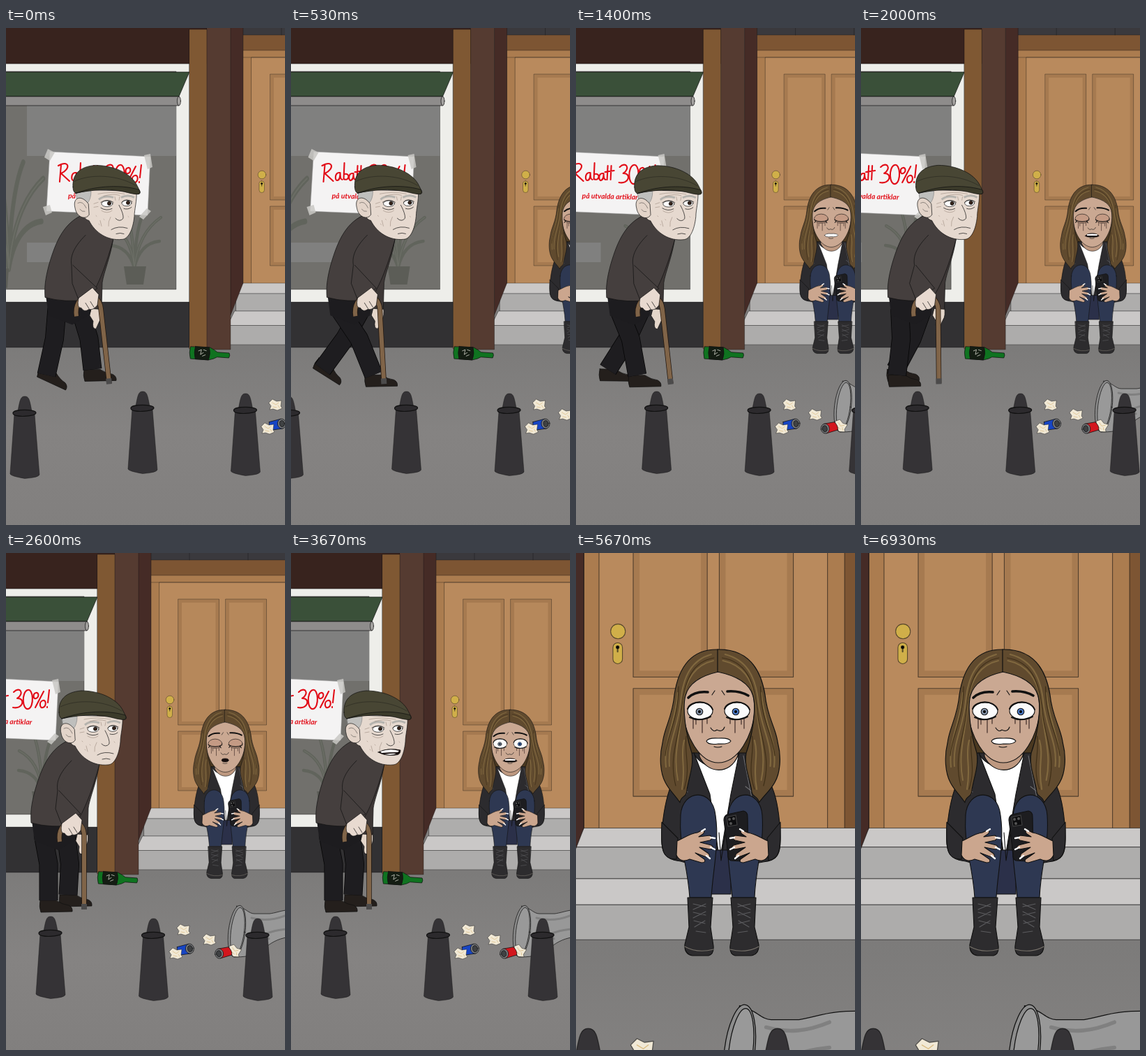
An HTML page that plays this animation: 400 px wide and 711 px high, repeating every 7000 ms.

```html
<!DOCTYPE html>
<html lang="sv">
<head>
<meta charset="utf-8">
<title>På trappan</title>
<style>
html, body { margin: 0; width: 100%; height: 100%; overflow: hidden; background: #82807f; }
svg { display: block; width: 100vw; height: 100vh; }
.ln { stroke: #111; stroke-width: .7; stroke-linejoin: round; stroke-linecap: round; }
.gl { stroke: #111; stroke-width: 1.1; stroke-linejoin: round; stroke-linecap: round; }
.soft { stroke-opacity: .6; stroke-width: .6; }
.no { fill: none; }
</style>
</head>
<body>
<svg viewBox="0 0 400 711" preserveAspectRatio="none">
<defs>
  <linearGradient id="ground" x2="0" y2="1"><stop stop-color="#7b7a79"/><stop offset=".5" stop-color="#858382"/><stop offset="1" stop-color="#817f7e"/></linearGradient>
  <g id="bollard" class="ln" stroke-opacity=".6" fill="#353336">
    <path d="M-15 25L-21 111Q-20 114 0 117.500Q20 116 21 112L14 25Z"/>
    <path d="M-10 21C-7 5 -6 0 0 0S7 5 10 21Z"/>
    <path fill="#2c2a2d" stroke-width="1.200" stroke-opacity="1" d="M-17 24C-17 18 16 18 16 23.500S-17 31 -17 24Z"/>
  </g>
  <g id="paper" class="ln" stroke-opacity=".6">
    <path fill="#f1e9d6" d="M-9 -3L-4 -8L2 -5L9 -6L8 2L10 5L3 8L-3 6L-8 7L-6 2Z"/>
    <path class="no" stroke="#c99b45" d="M-4 -3L1 0L5 -3M-3 3L2 4M4 1L6 4"/>
  </g>
  <g id="can" class="ln">
    <path d="M-11 -5L6 -7Q10 0 7 7L-8 7Q-13 1 -11 -5Z"/>
    <ellipse cx="6.500" rx="6" ry="7" fill="#77797c"/><ellipse cx="7" rx="3.500" ry="4.500" fill="#3f4143"/>
  </g>
  <g id="leaves" fill="none" stroke="#595e54" stroke-width="4.500" stroke-linecap="round" opacity=".65">
    <path d="M0 0Q-4 -45 -33 -60M0 0Q-8 -30 -34 -32M0 0Q-2 -55 -12 -82M0 0Q6 -50 38 -72M0 0Q8 -35 36 -38M0 0Q2 -60 16 -85"/>
    <path stroke="#6a6e64" stroke-width="1.200" d="M0 0Q-4 -45 -33 -60M0 0Q-2 -55 -12 -82M0 0Q6 -50 38 -72"/>
  </g>
  <g id="shoe" class="ln"><path fill="#241f1c" d="M-12 -9L11 -9Q20 -3 29 -2Q35 1 34 7L-11 8Q-14 0 -12 -9Z"/></g>
  <g id="hair" class="gl">
    <path fill="#604a2e" d="M204 138C166 137 147 163 141 203C138 236 127 248 124 272C119 292 121 315 128 328C134 340 142 346 149 357C150 347 159 350 159 339C162 320 169 305 166 286C158 262 152 222 157 204C163 182 186 174 204 170Z"/>
    <g class="no" stroke="#80683f" stroke-width="2">
      <path d="M194 145C166 153 154 175 150 212C147 250 131 270 134 305"/>
      <path d="M197 154C171 160 158 180 153 212C151 256 138 285 146 325"/>
      <path d="M146 200C143 242 125 268 129 306M155 268C149 292 158 305 152 338"/>
    </g>
    <g class="no" stroke="#3f2f18">
      <path d="M198 150C168 155 155 180 151 228C149 260 132 290 143 333M147 191C147 240 130 260 128 290M158 262C155 290 165 305 155 338"/>
    </g>
  </g>
  <g id="boot" class="gl">
    <path fill="#2d2c2e" d="M160 493L196 493L193 535L197 562Q198 574 190 576L167 576Q155 574 156 560L162 535Z"/>
    <path class="no" stroke="#77726a" d="M156 563Q174 573 197 567"/>
    <path class="no" stroke="#5c5c5f" d="M168 502L186 506M186 502L168 510M168 514L186 518M186 513L168 522M169 526L185 530M185 526L170 535M172 541L186 543"/>
  </g>
  <g id="hand" class="gl" fill="#cba68e">
    <path d="M145 412C154 408 164 401 174 400L182 396Q186 398 182 402L176 406L192 404Q198 408 192 411L178 414L194 418Q199 421 193 424L177 421L190 430Q194 436 187 435L171 429L184 438Q187 443 180 443L163 438C155 442 147 440 144 432Z"/>
    <path class="no" stroke="#fff" stroke-width="2.400" d="M180 398L185 395M193 407L199 408M193 421L199 424M187 433L192 437"/>
  </g>
  <path id="tears" class="no" stroke="#5b453d" stroke-width="1.500" stroke-linecap="round" d="M168 237L168 251M172 239L172 245M181 239L181 257M188 236L188 244"/>
  <g id="openEye">
    <ellipse class="gl" cx="178" cy="226" rx="18" ry="12" fill="#fbfbfb"/>
    <path class="no gl" style="stroke-width:2" d="M160 223C164 211 190 209 196 224M163 235Q177 242 193 234"/>
  </g>
  <g id="shutEye">
    <ellipse class="gl" cx="178" cy="226" rx="18" ry="12" fill="#c49a84"/>
    <path class="no gl" style="stroke-width:2" d="M160 229Q178 239 196 229M164 232L161 236M190 233L193 237"/>
  </g>
</defs>

<g id="cam">
  <rect x="-140" y="440" width="580" height="280" fill="url(#ground)"/>

  <!-- shop -->
  <g class="ln soft">
    <rect x="-140" y="392" width="271" height="65" fill="#323133"/>
    <rect x="-140" y="51" width="271" height="341" fill="#eeeeea"/>
    <rect x="-140" y="62" width="252" height="312" fill="#71706c"/>
    <rect x="-140" y="-2" width="300" height="53" fill="#38231e"/>
  </g>
  <path fill="#80807f" d="M-102 105H112V183H-102ZM-102 307H-16V335H-102Z"/>
  <use href="#leaves" x="52" y="343"/>
  <use href="#leaves" transform="translate(-128 345) scale(1.300 1.800)"/>
  <path fill="#5c5d57" d="M37 341H69L65 367H41ZM-140 344H-128L-130 372H-140Z"/>
  <g class="ln">
    <path fill="#3a5039" d="M-140 63H131L116 98H-140Z"/>
    <path fill="#8e8c8b" d="M-140 98H116Q119 105 116 111H-140Z"/>
    <ellipse cx="116" cy="104.500" rx="2.500" ry="6.500" fill="#a5a3a1"/>
  </g>
  <path fill="#f4f3f3" stroke="#aaa" stroke-width=".5" d="M-69 177L75 184L71 268L-74 262Z"/>
  <g fill="#c9c8c5" opacity=".85">
    <path d="M-72 173L-62 178L-69 190L-77 185ZM66 182L75 180L78 199L71 202ZM59 270L70 258L76 262L65 274ZM-79 256L-69 253L-66 264L-75 268Z"/>
  </g>
  <g class="no" stroke="#e20d18" stroke-width="2.100" stroke-linecap="round" stroke-linejoin="round">
    <path d="M-53 196L-55 220M-57 197C-42 188 -38 201 -53 208L-41 219M-32 207C-39 206 -39 219 -35 218C-31 217 -31 212 -31 207Q-31 217 -28 217M-25 193L-26 216C-18 220 -16 207 -25 209M-13 208C-20 207 -19 219 -16 218C-12 217 -12 212 -12 208Q-12 217 -9 217M-6 197L-7 217M-1 197L-2 217M-10 206L3 204"/>
    <path d="M11 199C20 190 27 201 16 208C28 207 25 224 10 221M31 196C22 199 23 225 32 223C41 220 39 193 31 196M43 200C38 201 39 210 43 208C48 206 47 199 43 200M54 198L42 221M53 211C47 212 48 223 53 221C58 219 58 210 53 211M62 196L60 214M59 220V221"/>
  </g>
  <text transform="translate(-43 243.500) rotate(1.500)" fill="#e20d18" font-family="Lato, sans-serif" font-weight="700" font-style="italic" font-size="10.300">på utvalda artiklar</text>

  <!-- doorway -->
  <g class="ln soft">
    <rect x="208" y="-2" width="230" height="380" fill="#7d5533"/>
    <path fill="#3a393d" d="M208 -2H438V10H208ZM263 -2V10M347 -2V10"/>
    <path fill="#ab7c4f" d="M208 32H414V370H208Z"/>
    <path fill="#b98a5d" d="M220 42H400.500V370H220Z"/>
    <path d="M208 42H414"/>
    <g id="panels"></g>
    <circle cx="235" cy="210" r="5.800" fill="#d0af49"/>
    <rect x="231" y="219" width="7.500" height="16.500" rx="3.700" fill="#d0af49"/>
    <path d="M234.700 223V226" stroke-width="1.200"/><circle cx="234.700" cy="222.500" r="1.200"/>
    <path fill="#cac8c7" d="M208 365H440V380H198Z"/>
    <path fill="#aeadac" d="M198 380H440V405H198Z"/>
    <path fill="#cac8c7" d="M196 405H440V425.500H186Z"/>
    <path fill="#adacab" d="M186 425.500H440V453H186Z"/>
    <path fill="#452b26" d="M190 -2H208V365L190 411Z"/>
    <path fill="#553b31" d="M156 -2H190V460H156Z"/>
    <path fill="#7f5833" d="M131 2H156V459H131Z"/>
  </g>

  <!-- bottle -->
  <g class="ln" transform="translate(131 464) rotate(4)">
    <path fill="#0f7320" d="M1 -8Q-1 0 2 9L28 9Q36 7 40 4L57 4Q59 0 57 -3L40 -3Q36 -6 29 -9Z"/>
    <path fill="#141d13" d="M8 -9H28Q31 0 28 9H9Q6 0 8 -9Z"/>
    <path class="no" stroke="#e5e5da" d="M13 -3L17 -5L16 2L20 -1M20 -5L24 -4M19 4L23 2"/>
  </g>

  <!-- seated girl, in close-up coordinates -->
  <g transform="translate(201.800 148.200) scale(.551)">
    <path class="gl" fill="#4a3820" d="M155 190H255L264 325H148Z"/>
    <path class="gl" fill="#2c2b2e" d="M167 286C140 312 127 345 123 400C121 430 128 439 150 441L200 455L268 442C288 440 294 432 293 405C291 350 282 318 243 286Z"/>
    <path class="gl" fill="#fff" d="M169 286C180 312 225 314 234 286L222 345L206 440L192 345Z"/>
    <path class="gl" fill="#bd9880" d="M177 270V291C188 316 221 318 232 290V270Z"/>
    <path class="gl no" style="stroke:#6d6d70" d="M165 290L158 345M240 290L252 350M150 335L160 342M243 334L252 341"/>
    <path class="gl" fill="#2b3049" d="M192 425H223L222 488H192Z"/>
    <g class="gl" fill="#2e3852">
      <path d="M150 375C153 337 196 336 200 375C206 415 196 455 194 493H163C160 445 147 420 150 375Z"/>
      <path d="M267 375C264 337 222 336 218 375C213 415 221 455 224 493H256C258 445 270 420 267 375Z"/>
    </g>
    <path class="gl no" d="M205 400L208 440L214 402"/>
    <path class="gl" fill="#1d1d20" d="M217 374L240 369Q246 370 246 377L247 435Q244 441 238 441L222 440Q217 438 218 430L212 382Q212 376 217 374Z"/>
    <path class="gl" fill="#0d0d0f" style="stroke:#444" d="M216 378L229 375L231 389L218 391Z"/>
    <g fill="#555"><circle cx="220" cy="381" r="2"/><circle cx="226" cy="380" r="2"/><circle cx="222" cy="387" r="2"/></g>
    <path class="gl" fill="#2c2b2e" d="M123 385L146 408L144 438C125 438 121 428 123 385ZM293 385L274 408L276 440C292 438 294 425 293 385Z"/>
    <use href="#hand"/><use href="#hand" transform="translate(420 0) scale(-1 1)"/>
    <use href="#boot"/><use href="#boot" transform="translate(418 0) scale(-1 1)"/>
    <path class="gl" fill="#caa892" d="M204 160C172 165 153 185 154 224C155 262 178 300 204 300C232 300 254 262 256 224C256 185 236 165 204 160Z"/>
    <use href="#hair"/><use href="#hair" transform="translate(203 0) scale(-1.080 1) translate(-204 0)"/>
    <path class="no gl" style="stroke-width:3.600" d="M161 207C168 200 178 198 189 199M217 198C229 197 238 199 247 204"/>
    <path class="no gl" d="M195 203L199 197M209 197L213 203M193 250Q197 257 202 253Q210 257 213 249M198 277Q203 279 209 277"/>
    <use href="#tears"/><use href="#tears" transform="translate(409 0) scale(-1 1)"/>
    <g id="wide">
      <use href="#openEye"/><use href="#openEye" x="53"/>
      <g class="gl"><circle cx="177" cy="227" r="4.800" fill="#8190a5"/><circle cx="229" cy="227" r="4.800" fill="#4a78c4"/></g>
      <circle cx="177" cy="227" r="2"/><circle cx="229" cy="227" r="2"/>
    </g>
    <g id="shut"><use href="#shutEye"/><use href="#shutEye" x="53"/></g>
    <g class="gl">
      <ellipse id="mo" cx="204" cy="269" rx="9" ry="4.500" fill="#150b0b"/>
      <path id="mt" fill="#fff" d="M187 269Q190 264 204 265Q219 264 222 269Q219 274 204 273Q189 275 187 269Z"/>
      <g id="ma"><path fill="#180c0c" d="M186 271Q190 264 204 264Q217 264 222 271Q217 275 204 274Q191 275 186 271Z"/><path fill="#fff" stroke="none" d="M190 267Q204 264 218 267L217 270H191Z"/></g>
    </g>
  </g>

  <!-- litter -->
  <g class="ln">
    <path fill="#989898" d="M331 505C344 508 348 516 356 516H378C393 514 402 507 440 510V550C415 548 390 545 366 570C354 577 340 578 327 578Z"/>
    <path class="no" style="stroke:#808080;stroke-width:3" d="M352 522C370 527 385 525 402 518M350 560C365 545 382 540 402 538M357 535L377 552"/>
    <ellipse cx="331" cy="541" rx="12" ry="37" transform="rotate(7 331 541)" fill="#8c8c8c"/>
    <ellipse cx="332" cy="541" rx="9.500" ry="34" transform="rotate(7 332 541)" fill="#999"/>
  </g>
  <use href="#paper" x="254" y="539"/><use href="#paper" x="291" y="553"/>
  <use href="#can" fill="#1745c4" transform="translate(257 567) rotate(-8)"/>
  <use href="#paper" x="243" y="573"/>
  <use href="#paper" transform="translate(327 569) rotate(25)"/>
  <use href="#can" fill="#d3161d" transform="translate(312 572) rotate(170)"/>

  <!-- old man -->
  <g id="man">
    <g id="legB"></g><g id="legA"></g>
    <path fill="#1d1c1f" d="M37 383H101L98 412L75 425L41 412Z"/>
    <path class="ln" fill="#e4d6ca" d="M103 400L117 400Q119 413 115 418L109 431Q103 431 105 420L100 412Z"/>
    <path class="ln" fill="#3d3736" d="M134 300C131 325 120 350 118 365L117 403L102 402L104 350Z"/>
    <path class="ln" fill="#453f3e" d="M92 267C64 278 52 304 42 338C36 360 35 372 36 386Q65 394 98 389C112 372 125 335 134 302L112 280Z"/>
    <path id="cane0" class="no" stroke="#221811" stroke-width="7.500"/>
    <path id="cane" class="no" stroke="#806448" stroke-width="6"/>
    <path id="tip" class="no" stroke="#4c4b4b" stroke-width="8"/>
    <path id="sleeve" class="ln" fill="#453f3e"/>
    <g id="grip"><path class="ln" fill="#e8dad0" d="M-14 -4L6 -19L15 -9L13 6Q7 14 1 12Q-6 17 -10 10Q-17 11 -14 -4Z"/><path class="ln no" d="M-4 3L1 11M3 1L8 9"/></g>
    <!-- head -->
    <g class="ln">
      <path fill="#e6d9cf" d="M90 232L167 234C168 248 164 260 164 270C162 290 155 303 146 303C126 305 108 294 99 276C94 275 90 270 90 262Z"/>
      <path fill="#bfbfbd" stroke="#888" d="M80 233L102 234Q102 246 96 252L93 268Q82 262 80 233Z"/>
      <path fill="#e3d4c9" d="M98 252C88 238 75 243 79 258C81 271 94 276 99 268Z"/>
      <path class="no" stroke-opacity=".6" d="M83 251Q90 247 95 258M86 260Q89 264 93 263"/>
    </g>
    <path class="no" stroke="#b5b3ae" stroke-width="3" d="M113 246Q121 239 134 243M145 243Q155 238 164 243"/>
    <g class="ln">
      <ellipse cx="125" cy="252" rx="8" ry="4.300" fill="#fff"/><ellipse cx="153" cy="251" rx="7" ry="4.300" fill="#fff"/>
      <circle cx="128" cy="251.500" r="2.600" fill="#35231a"/><circle cx="155" cy="250.500" r="2.600" fill="#35231a"/>
      <path class="no" d="M116 250Q125 244 134 250M146 250Q153 244 161 249M142 254Q149 267 148 273Q143 279 137 273M116 258Q124 263 132 259M149 259Q155 261 160 257"/>
      <path class="no" stroke="#8d7a6e" stroke-opacity=".7" d="M117 262Q125 267 132 262M112 238Q130 234 150 238M120 241Q133 237 143 240M106 252L112 250M106 257L112 256M130 271Q126 278 127 284M115 276L117 284M109 269L110 270M120 274L121 275M113 281L114 282M137 247L136 242M142 247L143 242M155 270L156 271"/>
      <path id="closed" class="no" d="M131 289Q141 283 154 287M138 295Q144 293 149 295"/>
      <g id="open"><path fill="#160d0b" d="M125 285Q139 278 157 282Q157 289 150 289Q136 291 125 285Z"/><path fill="#fff" stroke="none" d="M128 284Q142 279 155 283L153 285Q140 285 130 286Z"/><path fill="#fff" stroke="none" d="M134 288Q146 286 151 287Q146 290 134 288Z"/></g>
      <path fill="#484634" d="M76 228C75 211 84 199 108 197C135 197 160 209 168 226L172 234C174 241 166 238 150 234C128 229 103 231 80 237Q76 235 76 228Z"/>
      <path fill="#3b3a2a" d="M80 237C103 228 140 223 171 232C175 241 166 239 150 235C126 230 103 232 80 237Z"/>
      <path class="no" stroke-opacity=".5" d="M78 220C100 209 140 210 166 226"/>
    </g>
  </g>

  <use href="#bollard" x="-105" y="527"/><use href="#bollard" x="64" y="520"/>
  <use href="#bollard" x="211.500" y="523"/><use href="#bollard" x="361" y="523"/>
</g>
</svg>
<script>
const $ = id => document.getElementById(id);
const set = (id, name, value) => $(id).setAttribute(name, value);
const show = (id, on) => $(id).style.display = on ? '' : 'none';

const LOOP = 7000, STOP = 2300, CUT = 5530;
const TIMES = [0, 500, 1000, 1400, 2000, STOP];
const GAIT = {
  near: [49, 115, 32, 91, 60, 72],
  far: [115, 40, 97, 49, 58, 100],
  cane: [128, 118, 111, 128, 109, 112],
  hand: [98, 94, 90, 98, 90, 94]
};
// girl's mouth every 200 ms: o small, t teeth, a open
const MOUTHS = 'taotaoatotataooooaaaaaaaaaaataotatt';

const panel = (x, y, w, h) =>
  `<rect x="${x}" y="${y}" width="${w}" height="${h}" fill="#a67a50"/>
   <rect x="${x + 5}" y="${y + 5}" width="${w - 10}" height="${h - 10}" fill="#b6885b" stroke="none"/>`;
$('panels').innerHTML = [247, 315].map(x => panel(x, 66, 58.5, 180) + panel(x, 255, 58.5, 85)).join('');

function pose(values, t) {
  let i = 0;
  while (i < TIMES.length - 2 && t > TIMES[i + 1]) i++;
  const u = Math.min(1, (t - TIMES[i]) / (TIMES[i + 1] - TIMES[i]));
  return values[i] + (values[i + 1] - values[i]) * u * u * (3 - 2 * u);
}

function leg(id, hip, foot, other, y) {
  const ankle = foot - 11, tilt = Math.max(0, other - foot - 40);
  const d = `M${hip} 402L${(hip + ankle) / 2 + 4} 445L${ankle} ${y - 9}`;
  const line = (color, width) =>
    `<path d="${d}" fill="none" stroke="${color}" stroke-width="${width}" stroke-linejoin="round"/>`;
  $(id).innerHTML = `<use href="#shoe" transform="translate(${ankle} ${y - tilt / 3}) rotate(${tilt})"/>`
    + line('#050505', 27) + line('#1e1d20', 25.5);
}

function draw(t) {
  const left = Math.max(0, 1 - t / STOP), shift = 132 * left;
  set('cam', 'transform', t < CUT ? `translate(${shift} 0)` : 'translate(-366.3 -269) scale(1.815)');
  const bob = left && Math.sin(t / 160) * .6 - .6;
  set('man', 'transform', `translate(${20 * left - shift} ${bob})`);

  const near = pose(GAIT.near, t), far = pose(GAIT.far, t);
  leg('legB', 86, far, near, 498);
  leg('legA', 53, near, far, 506);

  const h = pose(GAIT.hand, t), c = pose(GAIT.cane, t), top = h + 18;
  const cane = `M${h - 17} 413C${h - 22} 380 ${top - 3} 374 ${top} 402L${c} 509`;
  set('cane0', 'd', cane);
  set('cane', 'd', cane);
  set('tip', 'd', `M${c + (top - c) * .07} 502L${c} 510`);
  set('sleeve', 'd', `M94 297C76 315 72 328 74 340L${h - 23} 366L${h - 14} 389L${h + 13} 373L76 340`);
  set('grip', 'transform', `translate(${h} 391)`);

  const talking = t > 3100 && t < 5300 && Math.floor(t / 160) % 2 === 0;
  show('open', talking);
  show('closed', !talking);
  show('wide', t >= 3600);
  show('shut', t < 3600);
  const mouth = MOUTHS[Math.floor(t / 200)];
  for (const m of 'ota') show('m' + m, m === mouth);
}

const start = performance.now();
function tick() {
  draw((performance.now() - start) % LOOP);
  requestAnimationFrame(tick);
}
tick();
</script>
</body>
</html>
```
